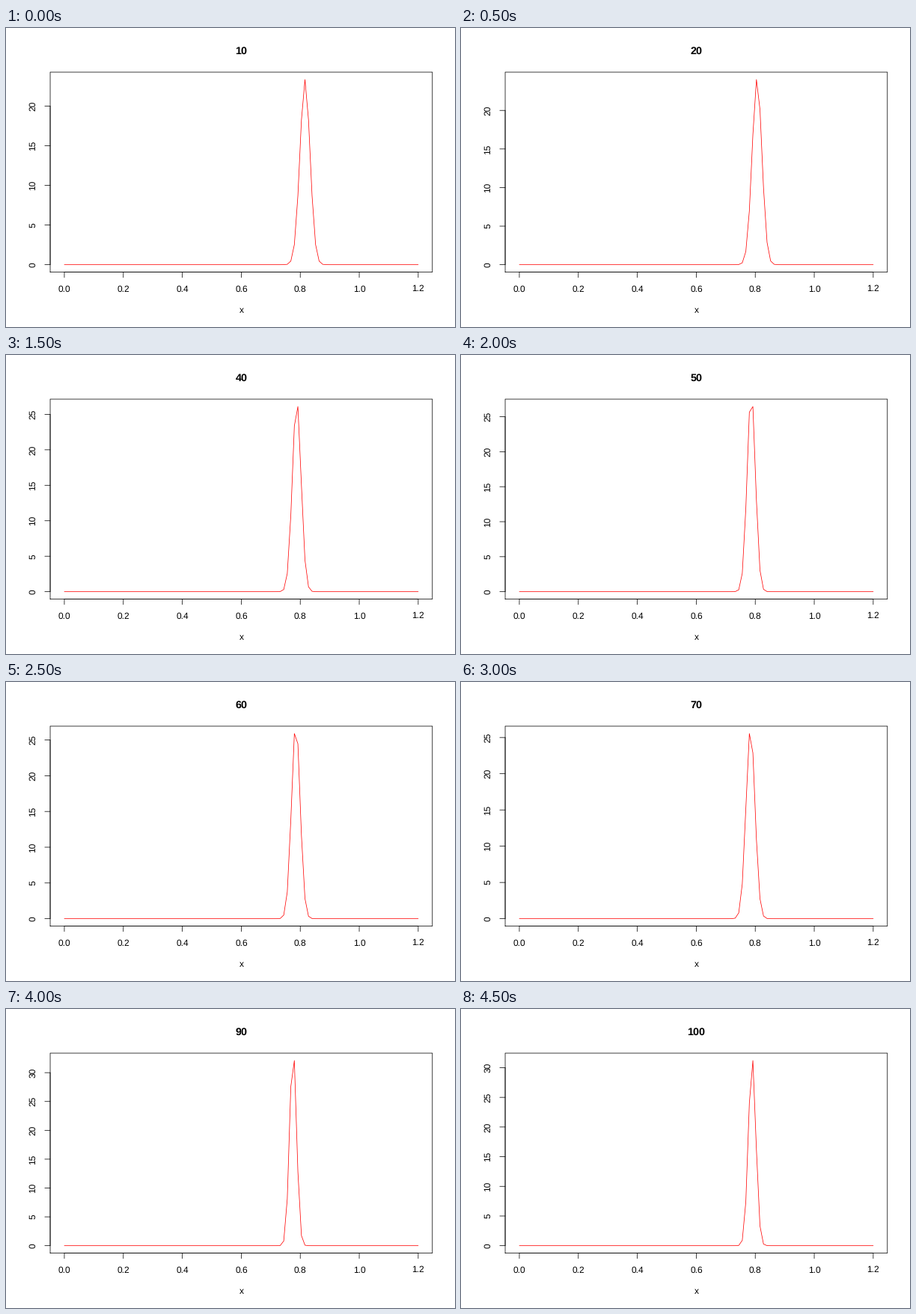
Recreate the animation shown at these times as a matplotlib script. Size 600 px wide and 400 px high, loop 5000 ms.

```python
import numpy as np
import matplotlib
import matplotlib.pyplot as plt
from matplotlib.animation import FuncAnimation

W, H, DPI = 600, 400, 100
PT = 72 / DPI  # points per pixel
LEFT, RIGHT, TOP, BOTTOM = 59.04, 569.76, 59.04, 326.56
TICK = 7.2
XMAX = 1.2
PAD = 0.04 / 1.08

matplotlib.rcParams.update({
    "font.family": "Liberation Sans",
    "text.hinting": "none",
    "path.simplify": False,
})

# (mean, highest plotted density) for each step of ten observations
CURVES = [
    (0.8160, 23.35), (0.8060, 24.00), (0.8052, 23.98), (0.7880, 26.10),
    (0.7865, 26.45), (0.7850, 25.90), (0.7839, 25.54), (0.7715, 32.90),
    (0.7757, 32.10), (0.7894, 31.20),
]

grid = np.linspace(0, XMAX, 101)


def x_px(x):
    pad = PAD * (RIGHT - LEFT)
    return LEFT + pad + x / XMAX * (RIGHT - LEFT - 2 * pad)


def y_px(y, peak):
    pad = PAD * (BOTTOM - TOP)
    return BOTTOM - pad - y / peak * (BOTTOM - TOP - 2 * pad)


def density(mean, peak):
    """Normal density on the grid whose largest sampled value is peak."""
    gap = np.abs(grid - mean).min()
    unit = 1 / np.sqrt(2 * np.pi)
    sd = unit / peak
    for _ in range(60):
        sd = unit / peak * np.exp(-0.5 * (gap / sd) ** 2)
    return unit / sd * np.exp(-0.5 * ((grid - mean) / sd) ** 2)


fig = plt.figure(figsize=(W / DPI, H / DPI), dpi=DPI, facecolor="white")
ax = fig.add_axes([0, 0, 1, 1])


def line(xs, ys, color="black"):
    ax.plot(xs, ys, color=color, lw=0.75 * PT, snap=False,
            solid_capstyle="round", solid_joinstyle="round")


def label(x, y, text, size=12, **kw):
    kw.setdefault("va", "baseline")
    kw.setdefault("ha", "center")
    ax.text(x, y, text, fontsize=size * PT, color="black", **kw)


def draw_x_axis():
    ticks = np.arange(7) * 0.2
    line([x_px(0), x_px(XMAX)], [BOTTOM, BOTTOM])
    for t in ticks:
        line([x_px(t)] * 2, [BOTTOM, BOTTOM + TICK])
        label(x_px(t), BOTTOM + 25.92, f"{t:.1f}")


def draw_y_axis(peak):
    ticks = np.arange(0, peak, 5)
    line([LEFT, LEFT], [y_px(0, peak), y_px(ticks[-1], peak)])
    for t in ticks:
        y = y_px(t, peak)
        line([LEFT, LEFT - TICK], [y, y])
        label(LEFT - 17.28, y, f"{t:.0f}", rotation=90,
              ha="right", va="center")


def draw(i):
    ax.clear()
    ax.set_axis_off()
    ax.set_xlim(0, W)
    ax.set_ylim(H, 0)
    ax.set_autoscale_on(False)

    mean, peak = CURVES[i]
    line(x_px(grid), y_px(density(mean, peak), peak), "red")
    draw_x_axis()
    draw_y_axis(peak)
    line([LEFT, RIGHT, RIGHT, LEFT, LEFT], [BOTTOM, BOTTOM, TOP, TOP, BOTTOM])

    center = (LEFT + RIGHT) / 2
    label(center, 34.7, str(10 * (i + 1)), 14.4, weight="bold")
    label(center, BOTTOM + 54.72, "x")
    return []


anim = FuncAnimation(fig, draw, frames=len(CURVES), interval=500,
                     init_func=lambda: draw(0), repeat=True, repeat_delay=0)
plt.show()
```
